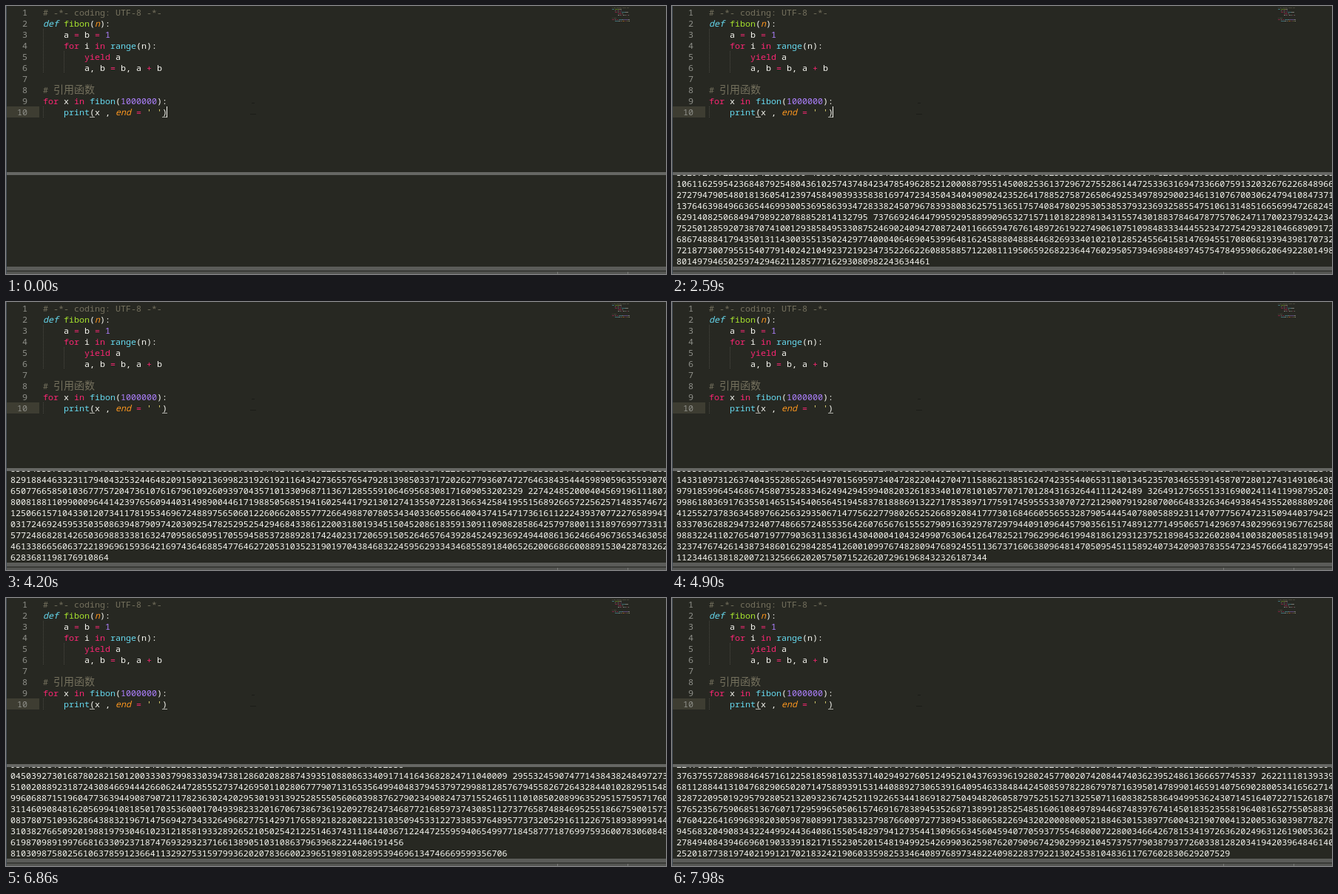
Animation of 892x363 px, one loop 8000 ms. Source, as an HTML page with a canvas:

```html
<!DOCTYPE html>
<html lang="en">
<head>
<meta charset="utf-8">
<title>Fibonacci generator</title>
<style>
  html, body { margin: 0; width: 100%; height: 100%; overflow: hidden; background: #272822; }
  canvas { display: block; }
</style>
</head>
<body>
<canvas id="stage" width="892" height="363"></canvas>
<script>
const start = performance.now();
const ctx = document.getElementById('stage').getContext('2d');

const LOOP = 8000, TICK = 70;
const CHAR = 7, LINE = 15;
const MONO = '11.6667px "Noto Sans Mono", "DejaVu Sans Mono", monospace';
const CJK = '14px "Noto Sans CJK SC", "Noto Sans CJK", sans-serif';

const color = {
  back: '#272822', text: '#f8f8f2', comment: '#75715e', key: '#f92672',
  call: '#66d9ef', name: '#a6e22e', arg: '#fd971f', num: '#ae81ff', str: '#e6db74'
};

// Each line: [style, text] pairs; a leading "/" marks italics.
const code = [
  [['comment', '# -*- coding: UTF-8 -*-']],
  [['/call', 'def'], ['text', ' '], ['name', 'fibon'], ['text', '('], ['/arg', 'n'], ['text', '):']],
  [['text', '    a '], ['key', '='], ['text', ' b '], ['key', '='], ['num', ' 1']],
  [['key', '    for'], ['text', ' i '], ['key', 'in'], ['call', ' range'], ['text', '(n):']],
  [['key', '        yield'], ['text', ' a']],
  [['text', '        a, b '], ['key', '='], ['text', ' b, a '], ['key', '+'], ['text', ' b']],
  [],
  [['comment', '# 引用函数']],
  [['key', 'for'], ['text', ' x '], ['key', 'in'], ['call', ' fibon'], ['text', '('], ['num', '1000000'], ['text', '):']],
  [['call', '    print'], ['text', '(x , '], ['/arg', 'end'], ['text', ' '], ['key', '='], ['str', " ' '"], ['text', ')']]
];

// Time in ms and how many numbers have been printed by then.
const progress = [
  [1540, 700], [1680, 1486], [2500, 2500], [3500, 3114],
  [4900, 3612], [5810, 3876], [6860, 4119], [7980, 4358]
];

// Console word wrap: words are cut into pieces of 255 digits, a piece that
// fits on a line moves down whole, a longer one fills the lines as it goes.
const WRAP = 131, PIECE = /\d{1,255} ?/g;
const rows = [''];
const ends = [[0, 0]];

function print(piece) {
  const free = WRAP - rows[rows.length - 1].length;
  if (piece.length > free && piece.length <= WRAP) rows.push('');
  while (piece) {
    const last = rows.length - 1;
    const room = WRAP - rows[last].length;
    if (!room) {
      rows.push('');
      continue;
    }
    rows[last] += piece.slice(0, room);
    piece = piece.slice(room);
  }
}

function printAll(count) {
  let a = 1n, b = 1n;
  for (let n = 1; n <= count; n++) {
    (a + ' ').match(PIECE).forEach(print);
    ends[n] = [rows.length - 1, rows[rows.length - 1].length];
    [a, b] = [b, a + b];
  }
}

function printedAt(t) {
  if (t < progress[0][0]) return 0;
  let i = 0;
  while (i < progress.length - 2 && t >= progress[i + 1][0]) i++;
  const [t0, n0] = progress[i], [t1, n1] = progress[i + 1];
  const part = Math.min(1, (t - t0) / (t1 - t0));
  return Math.round(Math.sqrt(n0 * n0 + (n1 * n1 - n0 * n0) * part));
}

const clamp = v => Math.max(0, Math.min(1, v));

function caretAlpha(t) {
  const u = t % 930;
  return u < 400 ? clamp((138 - u) / 88) : clamp((u - 600) / 115);
}

function box(fill, x, y, w, h) {
  ctx.fillStyle = fill;
  ctx.fillRect(x, y, w, h);
}

function text(str, x, y, fill, font = MONO) {
  ctx.font = font;
  ctx.fillStyle = fill;
  ctx.fillText(str, x, y);
}

function drawGuide(x, from, to) {
  for (let y = 1 + (from - 1) * LINE; y < 1 + to * LINE; y += 2) box('#4a4a42', x, y, 1, 1);
}

function drawCode() {
  box('#3e3d32', 0, 136, 45, LINE);
  drawGuide(50, 3, 6);
  drawGuide(78, 5, 6);
  drawGuide(50, 10, 10);
  code.forEach((line, i) => {
    const y = 13 + i * LINE;
    text(String(i + 1).padStart(2), 15, y, '#8f908a');
    let col = 0;
    for (const [style, str] of line) {
      const italic = style[0] === '/';
      const fill = color[style.replace('/', '')];
      const latin = str.replace(/[^\x00-\x7f]+/, '');
      text(latin, 50 + col * CHAR, y, fill, (italic ? 'italic ' : '') + MONO);
      col += latin.length;
      if (latin !== str) text(str.slice(latin.length), 50 + col * CHAR, y, fill, CJK);
    }
  });
  for (const x of [113, 211]) box('rgba(248,248,242,.65)', x, 150, CHAR, 1);
  box('#1b1c18', 332, 131, 4, 1);
  box('#1b1c18', 330, 146, 8, 1);
}

function drawMinimap() {
  ctx.globalAlpha = 0.4;
  code.forEach((line, i) => {
    let x = 819;
    for (const [style, str] of line) {
      for (const ch of str) {
        if (ch !== ' ') box(color[style.replace('/', '')], x, 2 + i * 2, 1, 1);
        x++;
      }
    }
  });
  ctx.globalAlpha = 1;
}

function drawConsole(count) {
  if (!count) return;
  const [last, length] = ends[count];
  ctx.save();
  ctx.beginPath();
  ctx.rect(0, 229, 892, 124);
  ctx.clip();
  for (let i = 0; i < 9 && i <= last; i++) {
    const row = rows[last - i];
    text(i ? row : row.slice(0, length), 6, 350 - i * LINE, color.text);
  }
  ctx.restore();
}

function drawFrame() {
  box('#666764', 0, 225, 892, 4);
  box('#5b5c59', 0, 353, 892, 5);
  box('#3a3b37', 0, 358, 892, 2);
  box('#555653', 0, 360, 892, 3);
  for (const x of [745, 840]) box('#7b7c79', x, 360, 1, 3);
  box('#47505a', 0, 0, 1, 363);
}

function draw(t) {
  box(color.back, 0, 0, 892, 363);
  drawCode();
  drawMinimap();
  drawConsole(printedAt(t));
  drawFrame();
  ctx.globalAlpha = caretAlpha(t);
  box(color.text, 217, 136, 1, LINE);
  ctx.globalAlpha = 1;
}

let shown = -1;
function loop() {
  const tick = Math.floor(((performance.now() - start) % LOOP) / TICK);
  if (tick !== shown) draw(tick * TICK);
  shown = tick;
  requestAnimationFrame(loop);
}

printAll(progress[progress.length - 1][1]);
loop();
</script>
</body>
</html>
```
